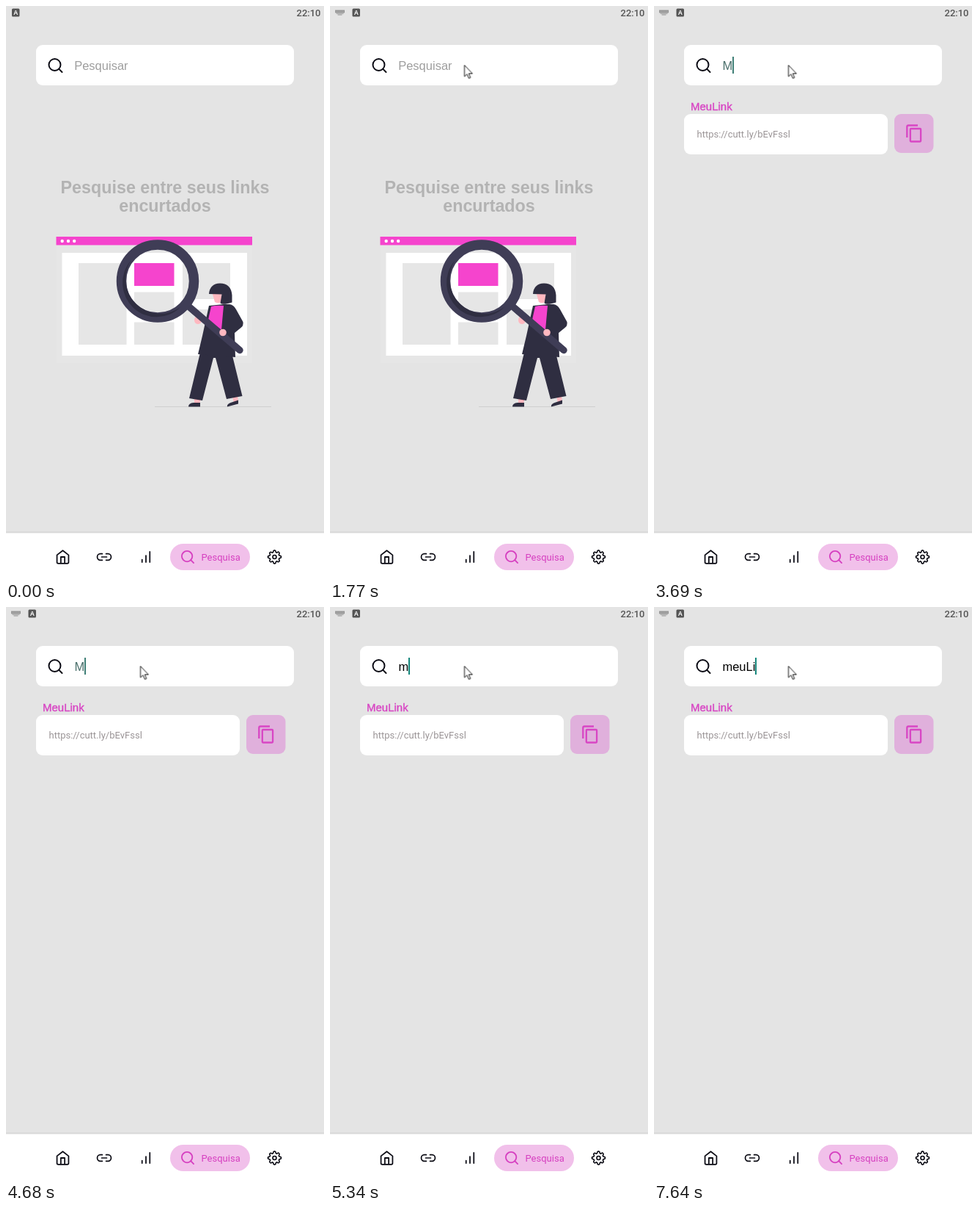
Recreate the animation shown at these times as an HTML page. Size 434 by 780 pixels, loop 8 s.

```html
<!DOCTYPE html>
<html lang="pt-BR">
<head>
<meta charset="utf-8">
<title>Pesquisa</title>
<style>
  html, body { margin: 0; width: 100%; height: 100%; overflow: hidden; background: #e4e4e4; }
  svg { position: absolute; left: 0; top: 0; }
  .sans { font-family: "Liberation Sans", Arial, sans-serif; }
  .ui { font-family: Roboto, sans-serif; font-size: 13px; }
  .line { fill: none; stroke: currentColor; stroke-width: 2; stroke-linecap: round; stroke-linejoin: round; }

  .empty, .results, .before, .after { animation: 8s step-end infinite; }
  .empty { animation-name: empty; }
  .results { animation-name: results; }
  .before { animation-name: before; }
  .after { animation-name: after; }

  /* The caret is the right edge of the clipped text box. */
  .typed {
    position: absolute; left: 93.4px; top: 69px; height: 23px;
    overflow: hidden; white-space: pre; font-size: 16.5px; line-height: 24px;
    border-right: 2px solid transparent;
    animation: type 8s step-end infinite;
  }
  .typed div { animation: retype 8s step-end infinite; }
  .typed span { color: #4a6f6b; }
  .pointer { animation: move 8s infinite; }

  @keyframes empty {
    0%, 62.625% { visibility: visible; }
    46.125%, 65.875%, 100% { visibility: hidden; }
  }
  @keyframes results {
    0%, 62.625% { visibility: hidden; }
    46.125%, 65.875%, 100% { visibility: visible; }
  }
  @keyframes before {
    0% { visibility: visible; }
    15.375%, 100% { visibility: hidden; }
  }
  @keyframes after {
    0% { visibility: hidden; }
    15.375%, 100% { visibility: visible; }
  }
  @keyframes type {
    0%, 22.125%, 34.5% { width: 0; border-color: transparent; }
    15.375%, 28.75%, 41.125% { width: 0; border-color: #16877c; }
    46.125%, 58.5% { width: .833em; border-color: #3f7f76; }
    52.75% { width: .833em; border-color: transparent; }
    62.625% { width: 0; border-color: #66668a; }
    65.875% { width: .833em; border-color: #16877c; }
    69.25% { width: 1.389em; border-color: #16877c; }
    71.75%, 84.5% { width: 1.945em; border-color: #16877c; }
    78.75% { width: 1.945em; border-color: transparent; }
    91.375% { width: 2.501em; border-color: #16877c; }
    95.5%, 100% { width: 2.723em; border-color: #16877c; }
  }
  @keyframes retype {
    0% { transform: none; }
    62.625%, 100% { transform: translateY(-24px); }
  }
  @keyframes move {
    0%, 1.5% { transform: translate(436px, 782px); animation-timing-function: cubic-bezier(.35, .2, .35, 1); }
    12%, 100% { transform: translate(183.5px, 80.5px); }
  }
</style>
</head>
<body>
<svg width="434" height="780" viewBox="0 0 434 780">
  <defs>
    <g id="search" class="line"><circle cx="-1" cy="-1" r="8"/><path d="M9 9 4.65 4.65"/></g>
    <path id="gear" d="M0-11a2 2 0 0 1 2 2v.1a1.65 1.65 0 0 0 1 1.5a1.65 1.65 0 0 0 1.8-.3l.1-.1a2 2 0 0 1 2.8 2.8l-.1.1a1.65 1.65 0 0 0-.3 1.8a1.65 1.65 0 0 0 1.5 1H9a2 2 0 0 1 2 2"/>
    <g id="layout">
      <rect width="10.5" height="11" rx="1.5" fill="#555"/>
      <text class="sans" x="5.2" y="8.3" font-size="8.5" font-weight="700" fill="#fff" text-anchor="middle">A</text>
    </g>
  </defs>

  <!-- Status bar -->
  <use href="#layout" class="before" x="8" y="3.5"/>
  <g class="after">
    <path d="M7 5.5h13v3.8H7z" fill="#929292"/>
    <path d="M8 7.4h11" stroke="#d2d2d2" stroke-width=".8" stroke-dasharray="1 1"/>
    <path d="M8.5 10.2h10M10.5 12h6" stroke="#929292"/>
    <use href="#layout" x="30.5" y="3.5"/>
  </g>
  <text class="ui" x="396.5" y="14" font-weight="500" fill="#555">22:10</text>

  <!-- Search field -->
  <rect x="41" y="53" width="352" height="55" rx="9" fill="#fff"/>
  <use href="#search" x="67.5" y="81" color="#0b0b14"/>

  <g class="empty">
    <text class="sans" x="93.2" y="87" font-size="16.5" fill="#9e9e9e">Pesquisar</text>
    <g class="sans" font-size="23.3" font-weight="700" fill="#b3b3b3" text-anchor="middle">
      <text x="217" y="254.5">Pesquise entre seus links</text>
      <text x="217" y="279.5">encurtados</text>
    </g>

    <!-- Browser window -->
    <path d="M68.5 325h267.5v161H68.5z" fill="#e6e6e6"/>
    <path d="M68.5 314h267.5v11.5H68.5z" fill="#f544cd"/>
    <g fill="#fff">
      <circle cx="76.7" cy="320" r="2.2"/><circle cx="85" cy="320" r="2.2"/><circle cx="93.2" cy="320" r="2.2"/>
      <path d="M76.5 336H329v140H76.5z"/>
    </g>
    <path d="M99 350h65.5v111H99zM175 389.5h54.5V420H175zM175 430.5h54.5V461H175zM241 350h65v49h-65zM241 413h65v48h-65z" fill="#e6e6e6"/>
    <path d="M175 350h54.5v31H175z" fill="#f544cd"/>

    <!-- Person and magnifier -->
    <path d="M203 545.5H362" stroke="#cfcfcf"/>
    <g fill="#ffb8c0">
      <path d="M257 533h9l-2 9h-7zM309 530h7l1 9-6 2z"/>
      <ellipse cx="262" cy="427.5" rx="5" ry="5.5"/>
      <path d="M281 389h13v13q-3 4-9 1z"/>
    </g>
    <g fill="#2f2e41">
      <path d="M249 545.5q0-5 7-5.5h9v5.500zM302 545.5q-1-4 6-6l9-3v5z"/>
      <path d="M265 472 250 534l18 3 15-58h3l15 56 21.500-4-14.500-59z"/>
      <path d="M277 408 297 406l8 0q6 1 9 7l9.500 17q1 5-3 8l-8.500 7 1 33-51-4 6-25z"/>
      <path d="M277 392q1-14 15-14.500 15 0 16.500 16v10q-13 4-16 1l2-12z"/>
    </g>
    <path d="M280 409q7-2 17-1l-3 33-18-14z" fill="#f544cd"/>
    <path d="M247 407 319 468.500" stroke="#3f3d56" stroke-width="9.500" stroke-linecap="round"/>
    <circle cx="296" cy="444.500" r="4.800" fill="#ffb8c0"/>
    <circle cx="207" cy="374.500" r="49.500" fill="none" stroke="#3f3d56" stroke-width="13.500"/>
    <path d="M170 347A46.400 46.400 0 0 0 238 410A47.300 47.300 0 0 1 170 347" fill="#2f2e41"/>
  </g>

  <g class="results">
    <text class="sans" x="50" y="142" font-size="15" fill="#d846c4" stroke="#d846c4" stroke-width=".4">MeuLink</text>
    <rect x="41" y="147" width="278" height="55" rx="9" fill="#fff"/>
    <text class="ui" x="58.500" y="179" fill="#9b9597">https://cutt.ly/bEvFssl</text>
    <rect x="328" y="147" width="53.500" height="53" rx="9" fill="#e0b0dc"/>
    <g fill="none" stroke="#d846c4" stroke-width="2.300">
      <path d="M345.300 179v-14.500q0-2 2-2H360"/>
      <rect x="349.800" y="167" width="14.300" height="17.500" rx="1"/>
    </g>
  </g>

  <!-- Bottom navigation -->
  <path d="M0 716.500h434" stroke="#d8d8d8" stroke-width="2"/>
  <path d="M0 717.500h434V780H0z" fill="#fff"/>
  <rect x="224" y="732" width="109" height="36" rx="18" fill="#f1c0ea"/>
  <g color="#0b0b14">
    <path class="line" transform="translate(77.500 750) scale(.88)" d="M-9-3 0-10 9-3V8a2 2 0 0 1-2 2H-7a2 2 0 0 1-2-2zM-3 10V0H3V10"/>
    <path class="line" transform="translate(134 750) scale(.86)" d="M3-5H6A5 5 0 0 1 6 5H3M-3 5H-6A5 5 0 0 1-6-5H-3M-4 0H4"/>
    <path class="line" transform="translate(191 750) scale(.88)" d="M-6 8V4M0 8V-2M6 8V-8"/>
    <g class="line" transform="translate(366.500 750) scale(.82)">
      <circle r="3"/>
      <use href="#gear"/>
      <use href="#gear" transform="rotate(90)"/>
      <use href="#gear" transform="rotate(180)"/>
      <use href="#gear" transform="rotate(270)"/>
    </g>
  </g>
  <use href="#search" transform="translate(248 750) scale(.9)" color="#d63fc0"/>
  <text class="ui" x="266.500" y="755" fill="#d63fc0">Pesquisa</text>
</svg>

<div class="typed sans"><div><span>M</span>
meuLi</div></div>

<svg width="434" height="780" viewBox="0 0 434 780">
  <path class="pointer" d="M0 0V15.500L3.500 12.300 6 18 8.300 17 5.900 11.500H10.900z" fill="#fff" stroke="#111"/>
</svg>
</body>
</html>
```
